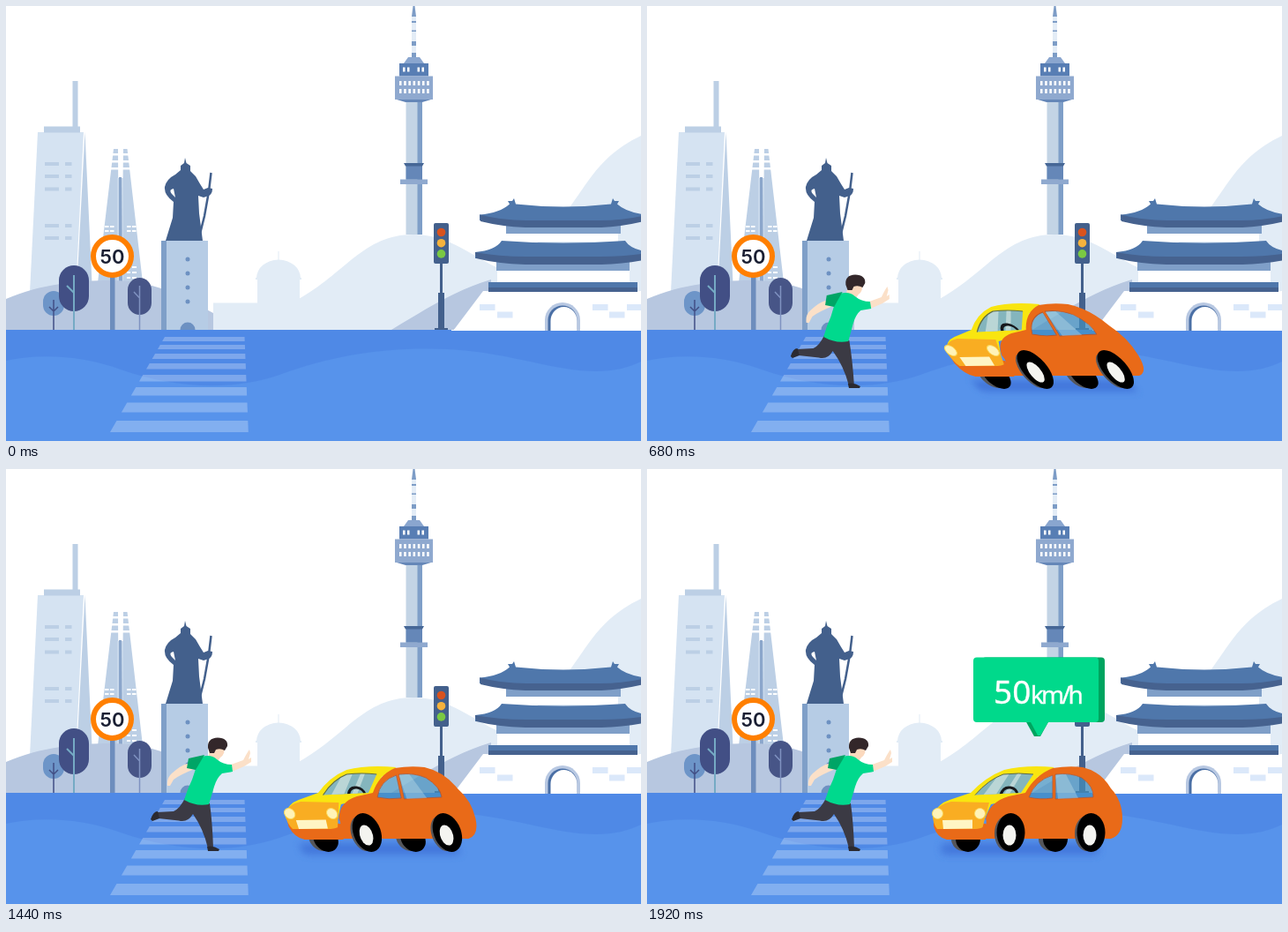
Animation of 720x493 px, one loop 2 s. Source, as an HTML page:

```html
<!DOCTYPE html>
<html lang="ko">
<head>
<meta charset="utf-8">
<style>
html, body { margin: 0; width: 100%; height: 100%; overflow: hidden; background: #fff; }
svg { display: block; width: 720px; height: 493px; }
</style>
</head>
<body>
<svg viewBox="0 0 720 493">
  <defs>
    <filter id="soft" x="-20%" y="-100%" width="140%" height="300%"><feGaussianBlur stdDeviation="4"/></filter>
    <clipPath id="glass"><path d="M372 369.500 Q387 352 404 346 Q422 344 438 346 L424 367 Q398 368 372 369.500Z"/></clipPath>
  </defs>

  <!-- hills and dome -->
  <g fill="#e2ecf6">
    <path d="M600 270 C656 225 655 178 720 147 V367 H600Z"/>
    <path d="M330 367 V333 C385 303 405 259 462 259 C505 259 528 285 565 300 V367Z"/>
    <path d="M235 336.500H285V310H283V308H284A25 21 0 0 1 308.500 287.500V278H309.500V287.500A25 21 0 0 1 334 308H335V310H333V367H235Z"/>
  </g>
  <g id="highrise">
    <path fill="#d5e3f2" d="M36 143H88L79 325H27Z"/>
    <path fill="#bccfe5" d="M43 136.500H75.500V85H81.500V136.500H84V143.500H43Z M89.500 143L98 325H80Z"/>
  </g>
  <g id="spire">
    <path fill="#bccfe5" d="M122 162H127L128 322H103Z M133 162H137.500L156 322H131Z"/>
    <path fill="#c9d9eb" d="M126 195H133V322H126Z"/>
    <path fill="#8ba6cb" d="M128 194H131L132 322H128Z"/>
  </g>
  <path fill="#b7c7e0" d="M0 332 C40 315 80 311 120 311 C165 311 195 326 235 348 V367H0Z M437 367 C480 341 510 322 550 310 V367Z"/>

  <!-- tower -->
  <path fill="#7d9cc6" d="M461.500 0H463.500L465 12V58H460V12Z"/>
  <g id="mast" fill="#e3ecf6"></g>
  <path fill="#8aa6cf" d="M456 58H469L474 65H451Z"/>
  <path fill="#c3d4e5" d="M453.500 108H467V259H453.500Z"/>
  <path fill="#7f9fc8" d="M466.500 108H472V259H466.500Z"/>
  <path fill="#587eb4" d="M446 65H479V79.500H446Z"/>
  <path fill="#8fa9cf" d="M441 79.500H484V106H441Z M447 196.500H478V202H447Z"/>
  <path fill="#6587b8" d="M443 106H482L472 109H453Z M453.500 180H472V196.500H453.500Z"/>
  <path fill="#466796" d="M451 178H474L472 181.500H453Z"/>
  <g id="deck" fill="#fff"></g>

  <!-- gate -->
  <path fill="#fff" d="M570 257H694V267H570Z M557 299H707V314H557Z M541 323H720V368H507Z"/>
  <path fill="#7f9fc8" d="M567 247H697V258H567Z M556 288H707V300H556Z"/>
  <path fill="#4f77ab" d="M537 236.500 Q560 234.500 571 224.500 L569 221 L574 221 L576 218 L578 224.500 Q632 230.500 686 224.500 L688 218 L690 221 L695 221 L693 224.500 Q704 234.500 727 236.500 V243 H537Z M532 279 Q555 277 562 266 Q632 271 702 266 Q709 277 732 279 V286H532Z M547 313H716V320H547Z"/>
  <path fill="#46628f" d="M537 236.500 Q562 243 590 243 H674 Q702 243 727 236.500 V243 Q700 250 675 251H589Q562 250 538 244Z M532 279 Q558 284 590 284 H674 Q706 284 732 279 V286 Q706 292 675 293H589Q557 292 533 286Z M547 319H716V324H547Z"/>
  <g id="bricks" fill="#dbe8fa"></g>
  <path fill="#b8c8e2" d="M611 368V356A20 20 0 0 1 651 356V368Z"/>
  <path fill="#4a6fa5" d="M614.500 368V356A16.500 16.500 0 0 1 647.500 356V368Z"/>
  <path fill="#fff" d="M617.500 368V357A15 16 0 0 1 647.500 357V368Z"/>

  <!-- statue and plinth -->
  <path fill="#b6cce5" d="M181 266H229V367H181Z"/>
  <path fill="#7f9fc8" d="M176 266H182V367H176Z"/>
  <g id="plinth" fill="#6d91c2"><path d="M197.500 367A8.500 8.500 0 0 1 214.500 367Z"/></g>
  <path fill="#43608c" fill-rule="evenodd" d="M203 172L204.500 178L209 181V187L215 193Q220 202 224 208L229 206L234 207Q234 213 230 215L224 217L218 215L219 235L223 266H181L189 240L190 222Q179 214 180 205Q182 196 192 191L198 186V181L202 178Z M190 207Q184 208 188 213L192 217Z"/>
  <path d="M232.500 189L230 210L225 238L220 258" fill="none" stroke="#43608c" stroke-width="2.500"/>

  <!-- trees -->
  <rect x="42" y="323" width="24" height="28" rx="12" fill="#6d95c8"/>
  <path d="M54 333V367M49 341L54 346L59 341" fill="none" stroke="#424f85" stroke-width="1.500"/>
  <rect x="60" y="294" width="34" height="52" rx="17" fill="#424f85"/>
  <path d="M77 305V367M69 317L77 325" fill="none" stroke="#75aac4" stroke-width="2"/>
  <rect x="138" y="308" width="27" height="42" rx="13.500" fill="#475587"/>
  <path d="M151.500 317V367M145 324L151.500 331" fill="none" stroke="#7f92c0" stroke-width="1.500"/>

  <!-- speed sign -->
  <path fill="#6d8dbd" d="M118 300H123.500V367H118Z"/>
  <circle cx="120.500" cy="283.500" r="21.500" fill="#fff" stroke="#ff7f00" stroke-width="6"/>
  <text x="120.500" y="292" text-anchor="middle" font-family="Inter, Arial, sans-serif" font-weight="600" font-size="22" fill="#1a1f33">50</text>

  <!-- traffic light -->
  <g fill="#43608c">
    <rect x="485" y="246" width="17" height="46" rx="2"/>
    <path d="M488 290H499V292H488Z M492 292H495V325H497V365H501V368H486V365H490V325H492Z"/>
  </g>
  <g id="lamps"></g>

  <!-- road -->
  <path fill="#4f89e6" d="M0 367H505V368H720V493H0Z"/>
  <path fill="#5793eb" d="M0 402 C40 393 90 397 130 412 C190 433 255 437 310 418 C370 396 430 386 500 389 C570 392 620 414 670 414 C690 414 705 410 720 403V493H0Z"/>
  <g id="crossing" fill="#fff" opacity=".26"></g>

  <g id="person">
    <path fill="#fbe0c8" d="M205 334L216 339Q196 347 190 352L186 359L183 359Q182 350 188 345Q198 336 205 334Z M255 335L269 330Q273 322 276 318L277 322L275 329L278 327V332L270 337L256 343Z"/>
    <path fill="#fbd9be" d="M231 318L247 315Q249 323 243 327L240 331L229 328Z"/>
    <path fill="#33272a" d="M229 316Q228 305 240 304.500Q252 305 251 314L248 319Q243 316 238 318L236 322L231 322Z"/>
    <path fill="#3b3a44" d="M203 373L231 379Q234 400 235 430H229Q224 408 212 391Q206 401 196 398.500L173 396L171 389L190 388Q197 385 203 373Z"/>
    <path fill="#2b2a31" d="M228 428Q235 426 242 431L241 433H229Z M164 397Q167 388 172 388L174 396L166 399Z"/>
    <path fill="#00d98d" d="M222 326Q233 323 239 329Q246 335 256 335L257 343L245 345Q239 350 236 360L230 380Q216 383 202 375Q206 362 211 352L215 340Z"/>
    <path fill="#00a566" d="M225 324L207 328L205 339L215 341Z"/>
  </g>

  <g id="car">
    <rect x="333" y="424" width="180" height="13" rx="6" fill="#3d70d7" opacity=".8" filter="url(#soft)"/>
    <g id="farWheels"></g>
    <path fill="#f9e510" d="M324 391Q331 379 343 375L367 367Q384 349 405 341Q430 335 462 338L443 349L430 371L390 380L383 396H324Z"/>
    <path fill="#e96a18" d="M325 396L384 402V420H340Q329 418 325 405Z"/>
    <path fill="#f9ad22" d="M324 392Q329 380 345 377L388 378L380 408H329Q324 402 324 392Z"/>
    <path fill="#e96a18" fill-rule="evenodd" d="M372 408Q388 407 384 396Q389 377 410 371L429 367Q440 347 460 339Q478 336 494 338Q515 343 526 362Q539 376 539 396Q539 415 526 419H376Q371 414 372 408Z
      M433 372Q440 353 460 347V373Q445 375 433 372Z M463 346Q481 344 493 350Q507 360 506 372L463 374Z"/>
    <path d="M433 372Q440 353 460 347V373Q445 375 433 372Z M463 346Q481 344 493 350Q507 360 506 372L463 374Z" fill="#4592c0" fill-opacity=".68" stroke="#b9562c" stroke-width=".8"/>
    <path fill="#cce4ea" opacity=".35" d="M463 347L475 346L489 373L466 374Z"/>
    <g clip-path="url(#glass)">
      <path fill="#84b5bd" d="M370 340H440V372H370Z"/>
      <path fill="#bad6d6" d="M400 345H411L395 370H381Z M420 345H425L410 370H404Z"/>
      <path fill="none" stroke="#17191c" stroke-width="3" d="M401 369Q404 360 412 361Q419 362 420 369"/>
    </g>
    <path d="M372 369.500Q387 352 404 346Q422 344 438 346" fill="none" stroke="#5f6b45" stroke-width="1"/>
    <path fill="#fff5c4" d="M335 398L369 397.500V407.500L336 408Z"/>
    <g fill="#fff3b8" stroke="#fbd95a"><circle cx="329.500" cy="390.500" r="6"/><circle cx="377.500" cy="390.500" r="6"/></g>
    <g id="nearWheels"></g>
  </g>

  <g id="bubble">
    <path fill="#00a45f" d="M429 285H456L446 303H439Z"/>
    <rect x="380" y="213.500" width="139" height="73.500" rx="4" fill="#00a45f"/>
    <path fill="#00d98b" d="M434 285H456L446 302H443Z"/>
    <rect x="370" y="213.500" width="142" height="73.500" rx="4" fill="#00d98b"/>
    <g fill="#fff" stroke="#fff" stroke-width=".4" font-family="'Noto Sans', 'Noto Sans CJK KR', sans-serif" font-weight="500">
      <text x="393" y="266" font-size="37">50</text>
      <text x="435" y="266" font-size="28" letter-spacing="-3">km/h</text>
    </g>
  </g>
</svg>
<script>
const LOOP = 2000, STEP = 40;
const $ = id => document.getElementById(id);
const add = (id, markup) => $(id).insertAdjacentHTML('beforeend', markup);
const rect = (x, y, w, h, fill) =>
  `<rect x="${x}" y="${y}" width="${w}" height="${h}"${fill ? ` fill="${fill}"` : ''}/>`;
const ellipse = (x, y, rx, ry, fill) =>
  `<ellipse cx="${x}" cy="${y}" rx="${rx}" ry="${ry}"${fill ? ` fill="${fill}"` : ''}/>`;

for (const y of [177, 191, 205.5, 247, 261])
  add('highrise', rect(44, y, 16, 4, '#bccfe5') + rect(67, y, 7.5, 4, '#bccfe5'));
for (const y of [167, 175, 183]) add('spire', rect(116, y, 27, 2.5, '#fff'));
for (const y of [249, 254])
  for (const x of [112, 118, 137, 143]) add('spire', rect(x, y, 4.5, 2, '#fff'));
for (const y of [295, 301, 307]) add('spire', rect(137, y, 4, 2, '#fff') + rect(143, y, 5, 2, '#fff'));
for (const [y, h] of [[12, 5], [19, 8.5], [29, 11], [45, 8]]) add('mast', rect(460, y, 5, h));
for (const x of [450, 455, 466.5, 471.5]) add('deck', rect(x, 69.5, 2.5, 5));
for (let i = 0; i < 7; i++)
  for (const y of [85, 94]) add('deck', rect(446 + i * 5.2, y, 2.5, 5));
for (const [x, y] of [[537, 338], [557, 346.5], [665, 338], [684, 346.5], [704, 338]])
  add('bricks', rect(x, y, 17.5, 7));
for (const y of [287, 303, 319, 335]) add('plinth', ellipse(206, y, 2.5, 2.5));
['#d9531e', '#f5b23d', '#7ac943'].forEach((c, i) => add('lamps', ellipse(493.5, 256.5 + i * 12.2, 4.8, 4.8, c)));

const leftEdge = y => 180 - (y - 375) * 0.574;
const rightEdge = y => 270.5 + (y - 375) * 0.04;
for (const [a, b] of [[375, 380], [384, 389], [394, 400], [405, 411.5], [418, 425.5], [432, 441.5], [449.5, 460.5], [470, 483]])
  add('crossing', `<path d="M${leftEdge(a)} ${a}H${rightEdge(a)}L${rightEdge(b)} ${b}H${leftEdge(b)}Z"/>`);

for (const x of [361, 460]) add('farWheels', ellipse(x - 2, 419, 14, 14, '#55565a') + ellipse(x + 3, 419, 14, 15, '#000'));
for (const x of [411, 502])
  add('nearWheels', ellipse(x - 3, 413, 14, 20, '#55565a') + ellipse(x + 1.5, 412, 16, 22, '#000') + ellipse(x, 415, 7.5, 11.5, '#f4f4f0'));

const linear = u => u;
const smooth = u => u * u * (3 - 2 * u);
const clamp = u => Math.min(1, Math.max(0, u));

// Interpolates [time, value] pairs.
function track(keys, t, ease = smooth) {
  if (t <= keys[0][0]) return keys[0][1];
  for (let i = 1; i < keys.length; i++) {
    const [t0, v0] = keys[i - 1], [t1, v1] = keys[i];
    if (t < t1) return v0 + (v1 - v0) * ease((t - t0) / (t1 - t0));
  }
  return keys[keys.length - 1][1];
}

const carLean = [[280, 0], [680, 31], [1000, 32.5], [1330, -14], [1450, 13], [1590, 0]];
const personLean = [[160, -6], [280, -2], [420, 29], [600, -14], [740, 12], [860, -4], [960, 0]];
const personStretch = [[280, 1], [420, 1.13], [600, 1]];
const bubbleDrop = [[1520, -63], [1600, -35], [1770, 38], [1920, 0]];
const bubbleStretch = [[1520, 1.24], [1600, 1.12], [1770, 0.86], [1920, 1]];

// Skews and stretches around the height of the pivot.
function lean(id, pivot, dx, angle, stretch, opacity) {
  $(id).setAttribute('transform', `translate(${dx} ${pivot}) skewX(${angle}) scale(1 ${stretch}) translate(0 ${-pivot})`);
  $(id).setAttribute('opacity', opacity);
}

function draw(t) {
  const fade = t < 160 ? 0 : clamp((t - 120) / 175);
  const carX = 283 * clamp((1040 - t) / 880) ** 2.3;
  lean('car', 426, carX, track(carLean, t), 1, fade);
  lean('person', 434, 0, track(personLean, t), track(personStretch, t), fade);
  const drop = track(bubbleDrop, t, linear), stretch = track(bubbleStretch, t, linear);
  $('bubble').setAttribute('transform', `translate(0 ${258 + drop}) scale(1 ${stretch}) translate(0 -258)`);
  $('bubble').setAttribute('opacity', t < 1520 ? 0 : clamp((t - 1480) / 100));
}

const start = performance.now();
function tick() {
  const t = (performance.now() - start) % LOOP;
  draw(Math.floor(t / STEP) * STEP);
  requestAnimationFrame(tick);
}
tick();
</script>
</body>
</html>
```
